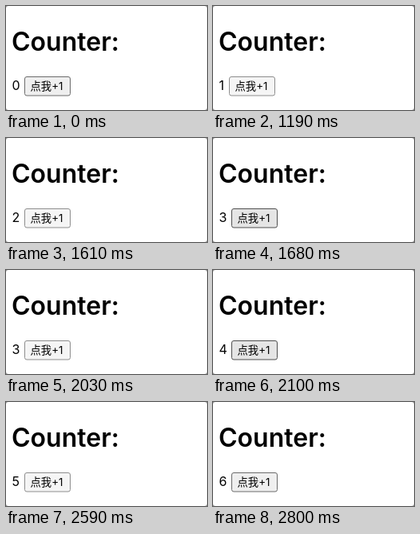
An HTML page with a canvas for the animation above (3220 ms loop, 252x130 px).

```html
<!DOCTYPE html>
<html lang="zh">
<head>
<meta charset="utf-8">
<title>Counter</title>
<style>
html, body { margin: 0; width: 100%; height: 100%; overflow: hidden; background: #fff; }
canvas { display: block; width: 252px; height: 130px; }
</style>
</head>
<body>
<canvas id="stage"></canvas>
<script>
const W = 252, H = 130, LOOP = 3220;
const canvas = document.getElementById('stage');
const ctx = canvas.getContext('2d');
const ratio = window.devicePixelRatio || 1;
canvas.width = W * ratio;
canvas.height = H * ratio;
ctx.scale(ratio, ratio);

const LOOKS = {
  idle: { fill: '#efefef', line: '#6b6b6b' },
  hover: { fill: '#e5e5e5', line: '#4f4f4f' },
  press: { fill: '#f5f5f5', line: '#8d8d8d' }
};

// [start ms, count, button look]
const STEPS = [
  [0, 0, 'idle'], [1190, 1, 'press'], [1260, 2, 'hover'],
  [1610, 2, 'press'], [1680, 3, 'hover'],
  [2030, 3, 'press'], [2100, 4, 'hover'],
  [2310, 4, 'press'], [2380, 5, 'hover'],
  [2590, 5, 'press'], [2730, 6, 'hover'], [2800, 6, 'idle']
];

function text(str, x, y, font, color = '#000') {
  ctx.font = font;
  ctx.fillStyle = color;
  ctx.fillText(str, x, y);
}

function box(x, y, w, h, r) {
  ctx.beginPath();
  ctx.roundRect(x, y, w, h, r);
}

function button(x, look) {
  box(x + 0.5, 88.5, 57, 23.5, 2.5);
  ctx.fillStyle = look.fill;
  ctx.fill();
  ctx.strokeStyle = look.line;
  ctx.lineWidth = 1;
  ctx.stroke();
  text('点我', x + 7.5, 105, '13.33px "Noto Sans CJK SC", "Noto Sans CJK", sans-serif');
  text('+1', x + 34.3, 105, '13.33px Inter, sans-serif');
}

function draw(t) {
  const [, count, look] = STEPS.findLast(step => step[0] <= t);
  ctx.fillStyle = '#8a8a8a';
  ctx.fillRect(0, 0, W, H);
  box(0, 0, W, H, 3);
  ctx.fillStyle = '#fff';
  ctx.fill();
  text('Counter:', 7, 56, '600 32px Inter, sans-serif');
  text(count, 7.5, 105, '16px Inter, sans-serif');
  button(count === 1 ? 20 : 23, LOOKS[look]);
}

function tick() {
  draw(performance.now() % LOOP);
  requestAnimationFrame(tick);
}
tick();
</script>
</body>
</html>
```
